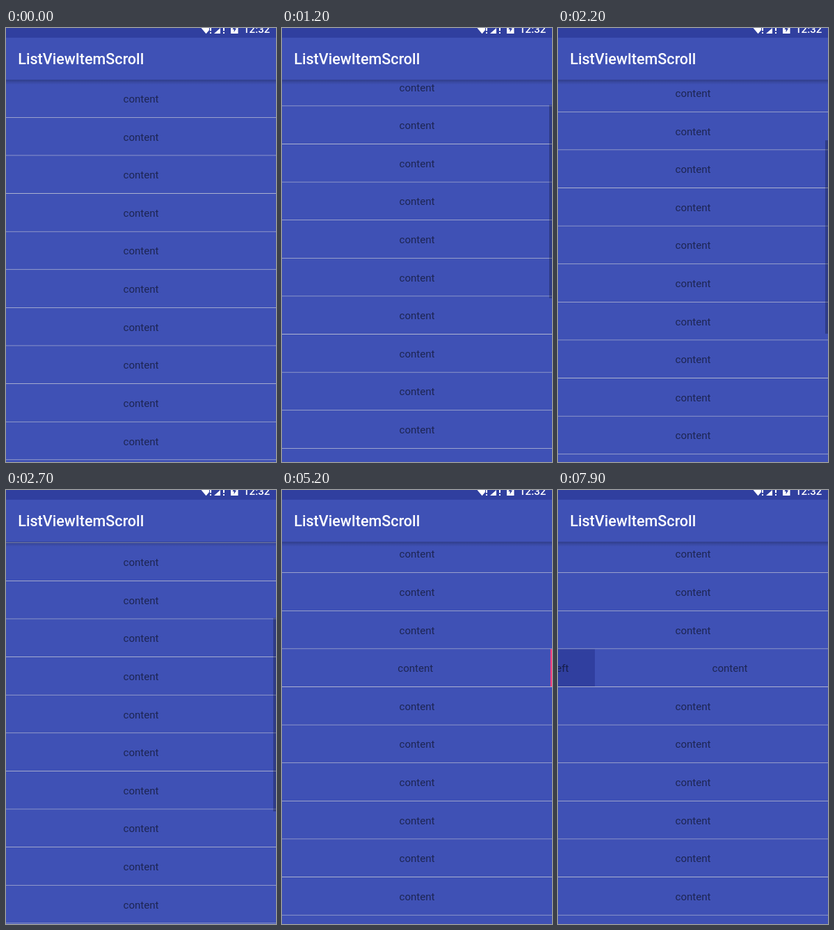
Recreate the animation shown at these times as an HTML page with a canvas. Size 388 by 623 pixels, loop 8 s.

```html
<!DOCTYPE html>
<html lang="en">
<head>
<meta charset="utf-8">
<title>List item swipe</title>
<style>
  html, body { margin: 0; width: 100%; height: 100%; overflow: hidden; background: #3f51b5; }
  canvas { display: block; width: 388px; height: 623px; }
</style>
</head>
<body>
<canvas id="stage"></canvas>
<script>
const W = 388, H = 623, LOOP = 8000, STEP = 100;
const DP = W / 360;
const PRIMARY = '#3f51b5', DARK = '#303f9f', ACCENT = '#ff4081', DIVIDER = '#dcdcdc';
const INK = 'rgba(0,0,0,.54)';
const FONT = 'Roboto, "Noto Sans", sans-serif';
const BAR_TOP = 13.9, LIST_TOP = 74.2;
const ROW = 50 * DP, LINE = 0.72, PITCH = ROW + LINE;
const ROWS = 20, SWIPED = 8, MENU = W / 4;

// [time, value]
const SCROLL = [[400, 0], [800, 30.3], [1700, 123.2], [2700, 216.4], [3100, 237],
  [3700, 237], [3800, 253.2], [3900, 272], [4000, 282.7]];
const SWIPE = [[5100, 0], [5700, -30], [5800, -30], [6300, -97], [6800, -97],
  [7300, 0], [7700, 0], [7900, 53]];

const canvas = document.getElementById('stage');
const ctx = canvas.getContext('2d');
const ratio = window.devicePixelRatio || 1;
canvas.width = Math.round(W * ratio);
canvas.height = Math.round(H * ratio);
ctx.scale(ratio, ratio);

function slope(keys, i) {
  const a = keys[i - 1], b = keys[i], c = keys[i + 1];
  if (!a || !c || (b[1] - a[1]) * (c[1] - b[1]) <= 0) return 0;
  return (c[1] - a[1]) / (c[0] - a[0]);
}

// Smooth curve through the keys, flat at ends and holds
function track(keys, t) {
  if (t <= keys[0][0]) return keys[0][1];
  const i = keys.findIndex(k => k[0] > t) - 1;
  if (i < 0) return keys[keys.length - 1][1];
  const [t0, v0] = keys[i], [t1, v1] = keys[i + 1];
  const d = t1 - t0, u = (t - t0) / d, w = 1 - u;
  return v0 * (1 + 2 * u) * w * w + v1 * u * u * (3 - 2 * u)
    + d * u * w * (slope(keys, i) * w - slope(keys, i + 1) * u);
}

function barAlpha(t) {
  if (t >= 500 && t < 3500 || t >= 3800 && t < 4400) return 1;
  return t >= 4400 && t < 4500 ? 0.5 : 0;
}

function rect(x, y, w, h, color) {
  ctx.fillStyle = color;
  ctx.fillRect(x, y, w, h);
}

function shape(points, color) {
  ctx.fillStyle = color;
  ctx.beginPath();
  points.forEach(p => ctx.lineTo(p[0], p[1]));
  ctx.fill();
}

function text(str, x, y, size, color, weight = 400, align = 'center') {
  ctx.font = `${weight} ${size}px ${FONT}`;
  ctx.textAlign = align;
  ctx.fillStyle = color;
  ctx.fillText(str, x, y);
}

function cell(label, x, y, w, color) {
  rect(x, y, w, ROW, color);
  text(label, x + w / 2, y + ROW / 2 + 5.9, 14 * DP, INK);
}

function list(scroll, swipe) {
  for (let i = 0; i < ROWS; i++) {
    const y = LIST_TOP + i * PITCH - scroll;
    if (y > H || y + PITCH < LIST_TOP) continue;
    const dx = i === SWIPED ? swipe : 0;
    cell('content', dx, y, W, PRIMARY);
    if (dx < 0) cell('right', W + dx, y, MENU, ACCENT);
    if (dx > 0) cell('left', dx - MENU, y, MENU, DARK);
    rect(0, y + ROW, W, LINE, DIVIDER);
  }
}

function statusBar() {
  rect(0, 0, W, BAR_TOP, DARK);
  shape([[280.5, 0], [287.5, 8.3], [292, 3], [292, 0]], '#fff');
  shape([[299, 8], [308, 0], [308, 8]], '#fff');
  for (const x of [293, 312]) {
    rect(x, 0, 2, 4.2, '#fff');
    rect(x, 6, 2, 2, '#fff');
  }
  rect(323, 0, 10.5, 8, '#fff');
  shape([[329, -3], [325.3, 2], [327.6, 2], [327.6, 6], [331.2, 0.6], [329, 0.6]], DARK);
  text('12:32', 341, 6.5, 14 * DP, '#fff', 500, 'left');
}

function toolbar() {
  const shade = ctx.createLinearGradient(0, LIST_TOP, 0, LIST_TOP + 7);
  shade.addColorStop(0, 'rgba(0,0,0,.26)');
  shade.addColorStop(0.45, 'rgba(0,0,0,.12)');
  shade.addColorStop(1, 'rgba(0,0,0,0)');
  rect(0, LIST_TOP, W, 7, shade);
  rect(0, BAR_TOP, W, LIST_TOP - BAR_TOP, PRIMARY);
  text('ListViewItemScroll', 16 * DP, 52.4, 20 * DP, '#fff', 500, 'left');
}

function draw(t) {
  const scroll = track(SCROLL, t);
  rect(0, 0, W, H, PRIMARY);
  list(scroll, track(SWIPE, t));
  const alpha = barAlpha(t);
  if (alpha) rect(W - 4, LIST_TOP + 0.2 + scroll * 0.505, 4, 277.6, `rgba(0,0,0,${0.26 * alpha})`);
  toolbar();
  statusBar();
}

const start = performance.now();
function frame() {
  const t = (performance.now() - start) % LOOP;
  draw(Math.floor(t / STEP) * STEP);
  requestAnimationFrame(frame);
}
frame();
</script>
</body>
</html>
```
